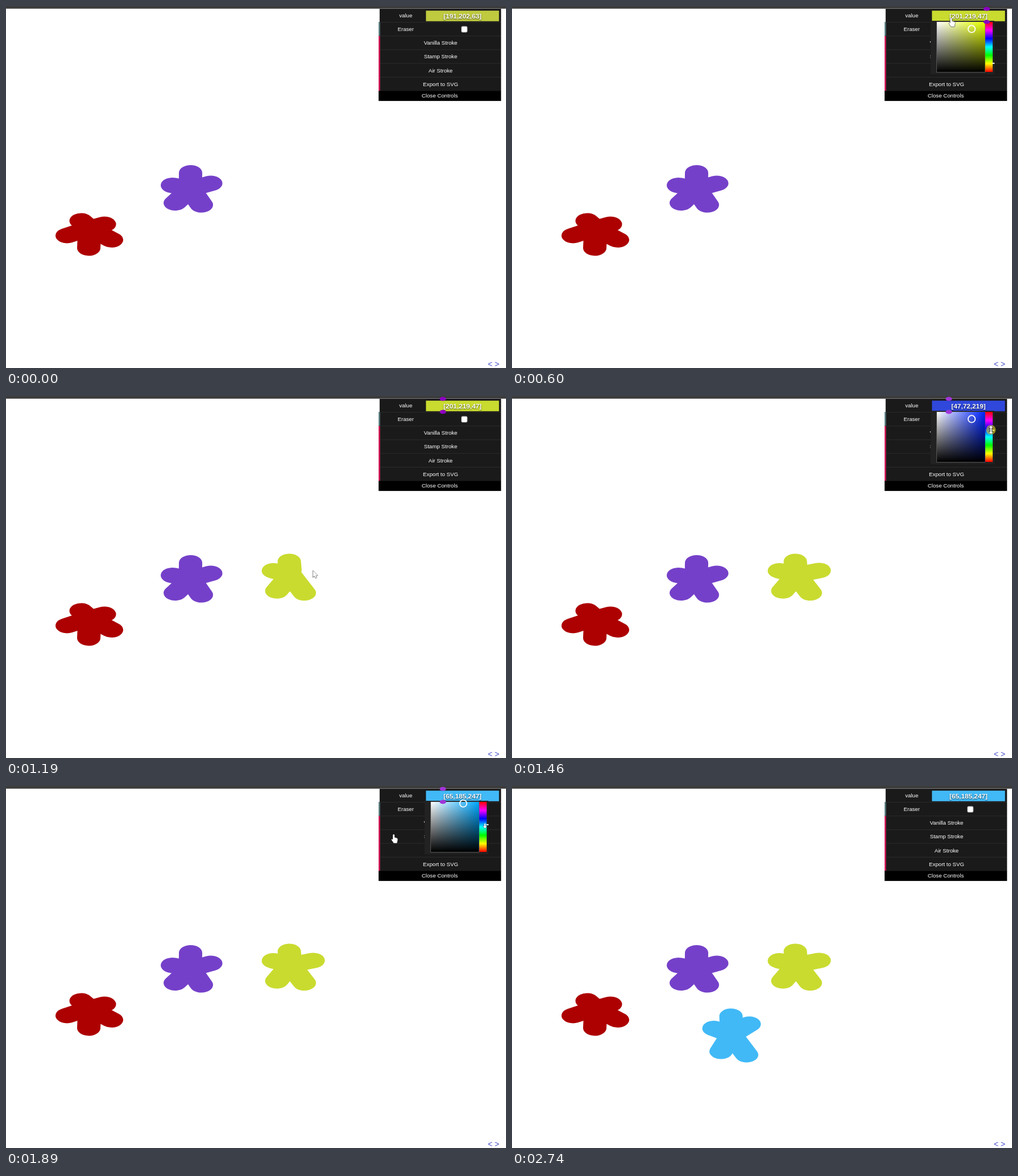
An HTML page with a canvas for the animation above (2810 ms loop, 879x637 px).

```html
<!DOCTYPE html>
<html lang="en">
<head>
<meta charset="utf-8">
<title>Flower painting</title>
<style>
html, body { margin: 0; width: 100%; height: 100%; overflow: hidden; background: #fff; }
canvas { display: block; }
</style>
</head>
<body>
<canvas id="stage" width="879" height="637"></canvas>
<script>
const ctx = document.getElementById('stage').getContext('2d');
const LOOP = 2810;
const FONT = '"Liberation Sans", Arial, sans-serif';
const BRUSH = 41, SQUASH = 0.66;
const STEP = 123, STROKE = 45;
const FIELD = { x: 747, y: 28, size: 88 };

// Hand-placed petals, each brushed towards the centre; a start time means it is painted live.
const flowers = [
  { color: '#ad0000', center: [147, 391],
    petals: [[132, 378], [107.5, 404], [145.5, 426], [185.5, 411.5], [173, 384]] },
  { color: '#7540c9', center: [324, 322],
    petals: [[324.5, 293.5], [292.5, 315.5], [297.5, 346.5], [343.5, 350], [360, 312]] },
  { color: '#c9db2f', center: [500, 315], start: 700,
    petals: [[498, 291], [470, 307.5], [476, 343], [524.5, 346.5], [540, 307]] },
  { color: '#41b9f7', center: [386, 438], start: 2100,
    petals: [[385, 405], [355, 426.5], [367.5, 467], [412.5, 473], [417, 419]] }
];

// Places in the picker that stand for a colour
const fieldSpot = (h, s, v) => [FIELD.x + s * FIELD.size, FIELD.y - 1 + (1 - v) * FIELD.size];
const hueSpot = h => [842, FIELD.y + (1 - h / 360) * FIELD.size];

const olive = [64.7, 0.688, 0.792], moss = [63.75, 0.667, 0.753], lime = [66.3, 0.785, 0.859];
const blue = [231.6, 0.785, 0.859], azure = [200.4, 0.785, 0.859], sky = [200.4, 0.737, 0.969];
const picks = [
  [270, olive, fieldSpot], [390, moss, fieldSpot], [500, lime, fieldSpot],
  [1390, lime, hueSpot], [1460, blue, hueSpot], [1600, azure, hueSpot],
  [1680, azure, fieldSpot], [1790, sky, fieldSpot]
];
const colorKeys = picks.map(([t, hsv]) => [t, ...hsv]);

// Free pointer moves; drags and brush strokes add their own points.
const pointerKeys = [
  [20, 856, 630], [180, 834, 20], [610, 768, 20], [1340, 800, 20],
  [1890, 683, 84], [2700, 741, 360], [2720, 868, 482]
];
const holds = [];
picks.forEach(([t, hsv, spot], i) => {
  pointerKeys.push([t, ...spot(...hsv)]);
  const next = picks[i + 1];
  if (next && next[0] - t < 200) holds.push([t, next[0]]);
});

// The first stroke of a flower stops short of the centre.
function strokeEnd({ center, petals }, i) {
  const reach = i ? 1 : 0.65;
  return petals[i].map((p, n) => p + (center[n] - p) * reach);
}
for (const f of flowers)
  if (f.start) f.petals.forEach((petal, i) => {
    const from = f.start + i * STEP, to = from + STROKE;
    pointerKeys.push([from, ...petal], [to, ...strokeEnd(f, i)]);
    holds.push([from, to]);
  });
pointerKeys.sort((a, b) => a[0] - b[0]);

const arrow = new Path2D('M0 0V12L2.8 9.5L4.7 13.7L6.6 12.8L4.8 8.7H8.5Z');
const hand = new Path2D('M-1.5 1Q-1.5-.5 0-.5T1.5 1V5L5.5 6Q7.2 6.8 7 9L5.8 15H0L-4 9Q-4 7-1.5 8.6Z');
const resize = new Path2D('M0-7.5L3.5-3.5H1V3.5H3.5L0 7.5L-3.5 3.5H-1V-3.5H-3.5Z');

const within = (t, [a, b]) => t >= a && t < b;

function sample(keys, t) {
  const i = keys.findIndex(k => k[0] > t);
  if (i < 0) return keys[keys.length - 1].slice(1);
  if (!i) return keys[0].slice(1);
  const a = keys[i - 1], b = keys[i], p = (t - a[0]) / (b[0] - a[0]);
  return a.slice(1).map((v, n) => v + (b[n + 1] - v) * p);
}

function toRgb(h, s, v) {
  return [5, 3, 1].map(n => {
    const k = (n + h / 60) % 6;
    return Math.round(255 * v * (1 - s * Math.max(0, Math.min(k, 4 - k, 1))));
  });
}

function rect(color, x, y, w, h) {
  ctx.fillStyle = color;
  ctx.fillRect(x, y, w, h);
}

function text(str, x, y, color = '#fff', font = '9.68px', align = 'center') {
  ctx.font = font + ' ' + FONT;
  ctx.textAlign = align;
  ctx.fillStyle = color;
  ctx.fillText(str, x, y);
}

function gradient(x0, y0, x1, y1, colors) {
  const g = ctx.createLinearGradient(x0, y0, x1, y1);
  colors.forEach((c, i) => g.addColorStop(i / (colors.length - 1), c));
  return g;
}

function ellipse(color, x, y, rx, ry) {
  ctx.fillStyle = color;
  ctx.beginPath();
  ctx.ellipse(x, y, rx, ry, 0, 0, 7);
  ctx.fill();
}

function drawFlower(f, t) {
  ctx.save();
  ctx.scale(1, SQUASH);
  ctx.lineWidth = BRUSH;
  ctx.lineCap = 'round';
  ctx.strokeStyle = f.color;
  f.petals.forEach(([x, y], i) => {
    const p = f.start ? Math.min(1, (t - f.start - i * STEP) / STROKE) : 1;
    if (p <= 0) return;
    const [ex, ey] = strokeEnd(f, i);
    ctx.beginPath();
    ctx.moveTo(x, y / SQUASH);
    ctx.lineTo(x + (ex - x) * p, (y + (ey - y) * p) / SQUASH);
    ctx.stroke();
  });
  ctx.restore();
}

function drawPanel(rgb) {
  const row = 24.15;
  rect('#1a1a1a', 655, 5, 215.3, 145);
  rect('#e4e4e4', 655, 5, 2, 23.5);
  rect('#5c7f83', 655, 28.5, 2.6, row);
  rect('#d81b58', 655, 52.8, 2.6, row * 4);
  for (let i = 1; i < 6; i++) rect('#2c2c2c', 657.6, 4 + i * row, 212.4, 1);
  rect('#000', 655, 149.5, 215.3, 17.6);
  text('value', 702.7, 20);
  text('Eraser', 702.7, 44);
  ['Vanilla Stroke', 'Stamp Stroke', 'Air Stroke', 'Export to SVG']
    .forEach((label, i) => text(label, 764, 68.3 + i * row));
  text('Close Controls', 762.5, 161.2);

  ctx.beginPath();
  ctx.roundRect(800.5, 35.8, 10.5, 10.5, 2);
  ctx.fillStyle = '#fff';
  ctx.fill();
  ctx.lineWidth = 1;
  ctx.strokeStyle = '#767676';
  ctx.stroke();

  rect(`rgb(${rgb})`, 738.3, 8.2, 128.4, 18.6);
  ctx.save();
  ctx.shadowColor = 'rgba(0,0,0,.7)';
  ctx.shadowOffsetY = 1;
  ctx.shadowBlur = 2;
  text(`[${rgb}]`, 802.5, 21.5, '#fff', 'bold 11.8px');
  ctx.restore();
}

function drawPicker(h, s, v) {
  const { x, y, size } = FIELD, bottom = y + size;
  rect('#222', 736, 26, 112, 94);
  rect('#555', x - 1, y - 0.5, 86, size + 1.5);
  rect(gradient(x, 0, x + 84, 0, ['#fff', `hsl(${h},100%,50%)`]), x, y, 84.5, size);
  rect(gradient(0, y, 0, bottom, ['rgba(0,0,0,0)', '#000']), x, y, 84.5, size);
  const hues = Array.from({ length: 7 }, (_, i) => `hsl(${360 - i * 60},100%,50%)`);
  rect(gradient(0, y, 0, bottom, hues), 832, y, 13, size);
  rect('#fff', 844.5, hueSpot(h)[1], 3.8, 2);
  const [px, py] = fieldSpot(h, s, v);
  ctx.beginPath();
  ctx.arc(px - 8, py + 1, 6.2, 0, 7);
  ctx.lineWidth = 1.8;
  ctx.strokeStyle = '#fff';
  ctx.stroke();
}

function drawShape(path, x, y, outline = '#111') {
  ctx.save();
  ctx.translate(x, y);
  ctx.lineWidth = 1;
  ctx.strokeStyle = outline;
  ctx.stroke(path);
  ctx.fillStyle = '#fff';
  ctx.fill(path);
  ctx.restore();
}

function drawPointer(t, open) {
  const [x, y] = sample(pointerKeys, t);
  if (holds.some(h => within(t, h))) ellipse('rgba(225,215,30,.6)', x, y, 8.5, 8.5);
  const onPanel = x > 655 && x < 870 && y < 167;
  const onHue = open && x > 832 && y > 28 && y < 117;
  drawShape(onHue ? resize : onPanel ? hand : arrow, x, y);
}

function draw(t) {
  const hsv = sample(colorKeys, t);
  const again = within(t, [1330, 1915]);
  const open = again || within(t, [190, 640]);
  rect('#fff', 0, 0, 879, 637);
  rect('#3c3c3c', 0, 0, 879, 4.7);
  for (const f of flowers) drawFlower(f, t);
  text('< >', 847, 634.5, '#4550cc', '14px', 'left');
  drawPanel(toRgb(...hsv));
  if (open) drawPicker(...hsv);

  // Brush marker left where the pointer last crossed the value field
  if (within(t, [180, 1915]))
    for (const y of [5, 28])
      ellipse(again ? '#a035d8' : '#8c00c0', t < 610 ? 834.5 : 768, y, 5.7, 3.6);

  // Part of the resize pointer lingers on the hue bar
  if (again && t >= 1640) {
    ctx.save();
    ctx.beginPath();
    ctx.rect(836, 66, 12, 12);
    ctx.clip();
    drawShape(resize, ...hueSpot(hsv[0]), '#335');
    ctx.restore();
  }
  if (within(t, [20, 2740])) drawPointer(t, open);
}

const began = performance.now();
function frame() {
  draw((performance.now() - began) % LOOP);
  requestAnimationFrame(frame);
}
frame();
</script>
</body>
</html>
```
